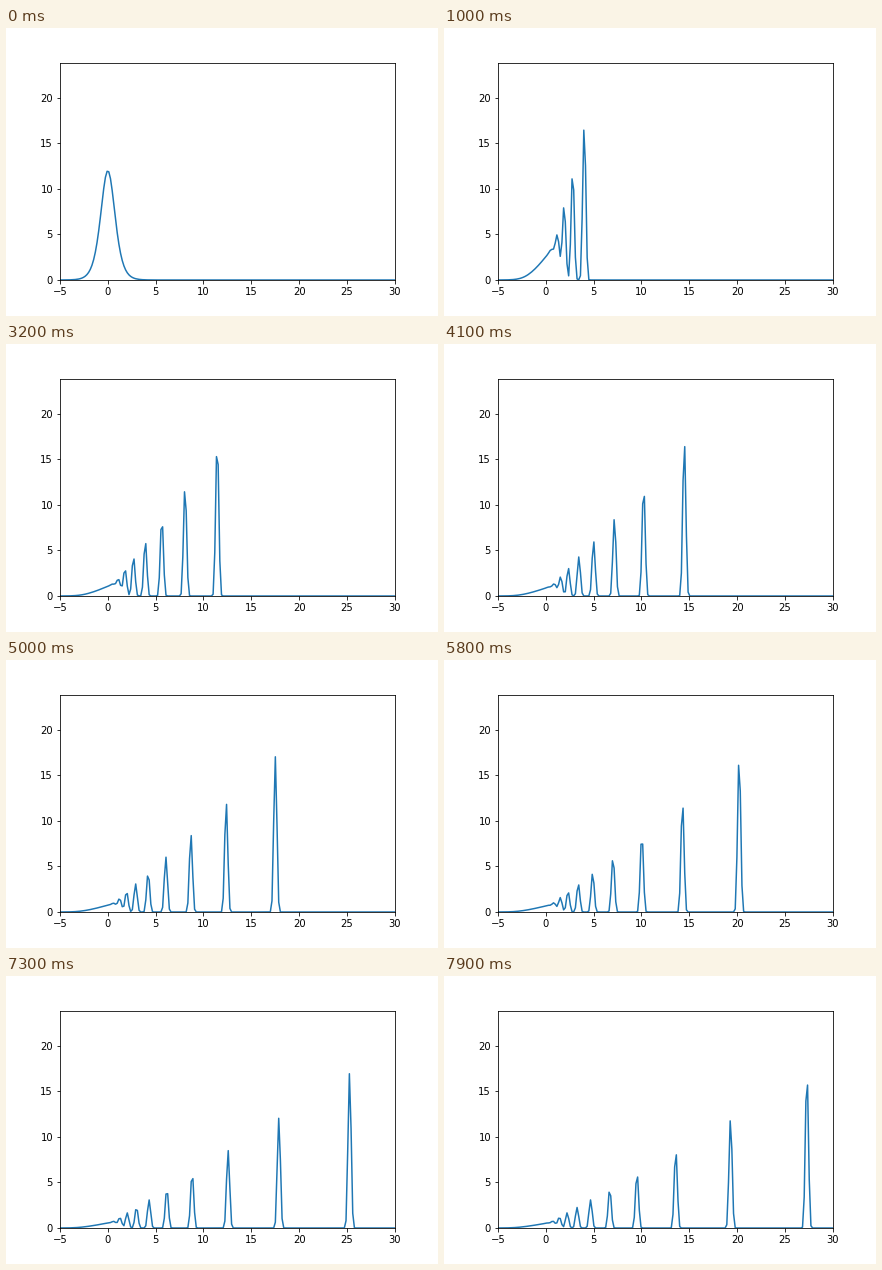
A matplotlib script that plays this animation: 432 px wide and 288 px high, repeating every 8 s.

```python
import numpy as np
import matplotlib.pyplot as plt
from matplotlib.animation import FuncAnimation

# Inviscid Burgers equation with central differences: the steep front
# breaks up into a train of grid-scale pulses.
FRAMES = 80
INTERVAL = 100
DT = 0.001
X_END = 27.29  # where the leading pulse stands in the last frame

x = np.linspace(-5, 30, 200)
dx = x[1] - x[0]
u0 = 12 / np.cosh(x) ** 2


def rate(u):
    flux = u ** 2 / 2
    du = np.zeros_like(u)
    du[1:-1] = (flux[:-2] - flux[2:]) / (2 * dx)
    return du


def rk4(u):
    k1 = rate(u)
    k2 = rate(u + DT / 2 * k1)
    k3 = rate(u + DT / 2 * k2)
    k4 = rate(u + DT * k3)
    return u + DT / 6 * (k1 + 2 * k2 + 2 * k3 + k4)


def front(u):
    """Centre of the tallest pulse."""
    i = int(np.argmax(u))
    part = slice(max(i - 3, 0), i + 4)
    weight = u[part] ** 2
    return np.sum(x[part] * weight) / np.sum(weight)


def solve():
    states, pos = [u0], [front(u0)]
    while pos[-1] < X_END and len(states) < 8000:
        states.append(rk4(states[-1]))
        pos.append(front(states[-1]))
    return np.array(states)


states = solve()
stride = (len(states) - 1) / (FRAMES - 1)

plt.rcParams["font.family"] = "DejaVu Sans"
fig, ax = plt.subplots(figsize=(6, 4), dpi=72)
fig.subplots_adjust(left=0.125, right=0.9, bottom=0.125, top=0.88)
ax.set_xlim(-5, 30)
ax.set_ylim(0, 2 * u0.max())
line, = ax.plot(x, u0, color="#1f77b4", lw=1.5)


def update(n):
    line.set_ydata(states[int(round(n * stride))])
    return line,


anim = FuncAnimation(fig, update, frames=FRAMES, interval=INTERVAL,
                     repeat=True, repeat_delay=0)
plt.show()
```
